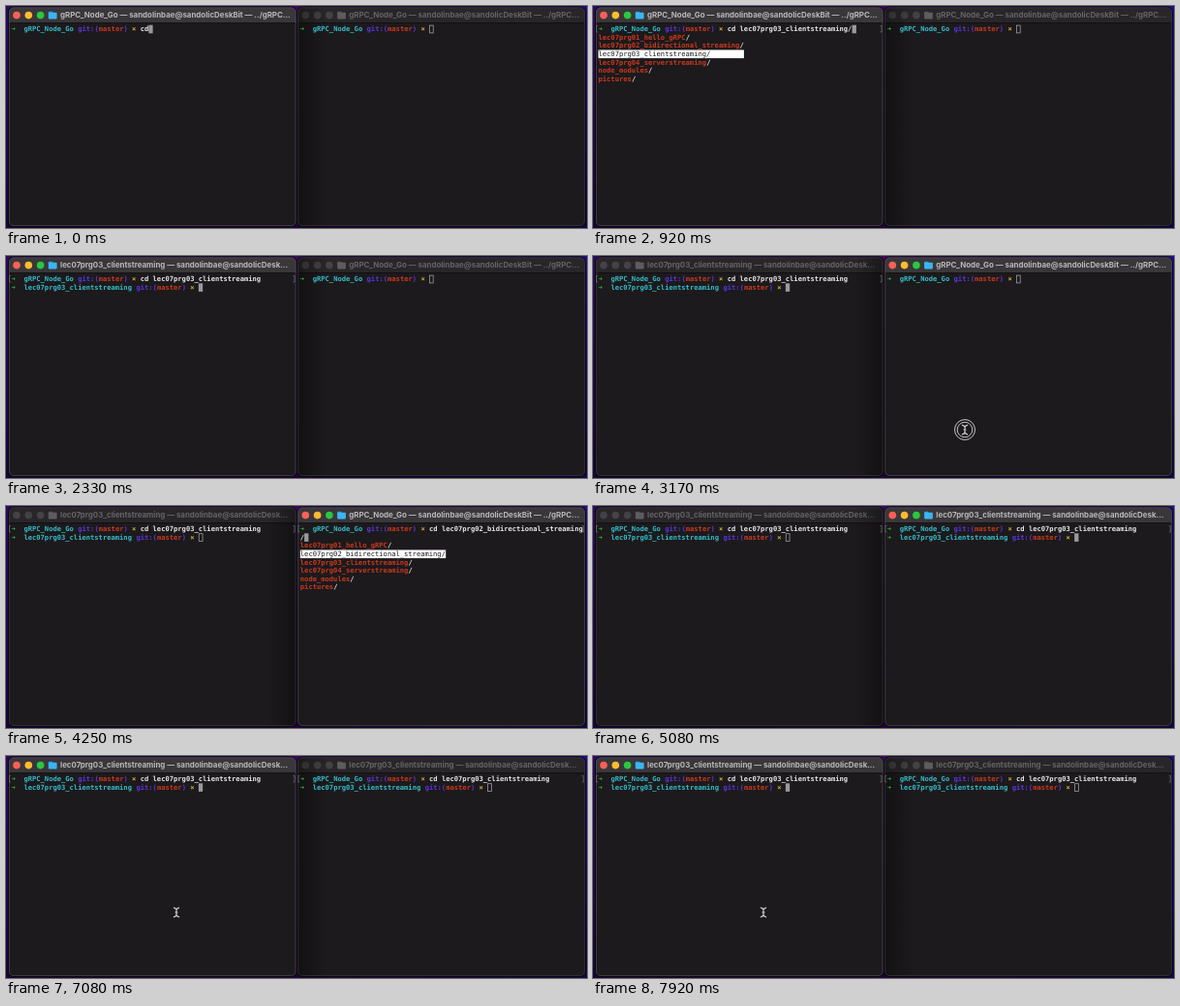
An HTML page with a canvas for the animation above (8 s loop, 600x230 px).

```html
<!DOCTYPE html>
<html lang="en">
<head>
<meta charset="utf-8">
<title>Two terminals</title>
<style>
  html, body { margin: 0; width: 100%; height: 100%; overflow: hidden; background: #1b0a48; }
  canvas { display: block; width: 600px; height: 230px; }
</style>
</head>
<body>
<canvas id="stage"></canvas>
<script>
const LOOP = 8000, COLS = 68, CELL = 4.297, ROW = 8.6, FIRST_ROW = 24;
const CURSOR_DELAY = 170;
const MONO = '7.14px "DejaVu Sans Mono", monospace';
const TITLE = '700 7.9px Inter, sans-serif';
const COLOR = {
  green: '#2fb43a', cyan: '#35bcca', blue: '#5a35dc', red: '#c8381f',
  yellow: '#c9b536', text: '#e6e4e6', cursor: '#9b999c'
};
const USER = 'sandolinbae', HOST = 'sandolicDeskBit';
const HOME = 'gRPC_Node_Go', TARGET = 'lec07prg03_clientstreaming';
const DIRS = ['lec07prg01_hello_gRPC', 'lec07prg02_bidirectional_streaming', TARGET,
  'lec07prg04_serverstreaming', 'node_modules', 'pictures'];

// Each step: start time, command text or picked menu index, phase.
const terminals = [
  { x: 0, steps: [
    [0, 'cd', 'type'], [160, 'cd ', 'type'], [240, -1, 'menu'], [410, 0, 'menu'],
    [580, 1, 'menu'], [740, 2, 'menu'], [1490, 'cd ' + TARGET, 'type'], [1660, '', 'done']] },
  { x: 298.3, steps: [
    [0, '', 'type'], [3410, 'c', 'type'], [3490, 'cd', 'type'], [3570, 'cd ', 'type'],
    [3740, -1, 'menu'], [3990, 0, 'menu'], [4160, 1, 'menu'], [4490, 2, 'menu'],
    [4910, 'cd ' + TARGET, 'type'], [5080, '', 'done']] }
];
const focusSteps = [[0, 0], [3080, 1], [5910, 0]];
// Pointer: time, x, y; it is hidden while typing.
const pointerPaths = [
  [[2580, 310, 150], [2990, 384, 180], [3410, 384, 180]],
  [[5410, 384, 180], [5830, 176, 162], [LOOP, 176, 162]]
];
const clicks = [[2990, 3260], [5830, 6080]];

const canvas = document.getElementById('stage');
const g = canvas.getContext('2d');
const ratio = window.devicePixelRatio || 1;
canvas.width = 600 * ratio;
canvas.height = 230 * ratio;
g.scale(ratio, ratio);
g.textBaseline = 'middle';

const stepAt = (steps, t) => steps.filter(s => s[0] <= t).pop();
const focusAt = t => stepAt(focusSteps, Math.max(0, t))[1];

function gradient(x0, y0, x1, y1, ...colors) {
  const fill = g.createLinearGradient(x0, y0, x1, y1);
  colors.forEach((c, i) => fill.addColorStop(i / (colors.length - 1), c));
  return fill;
}

function rect(x, y, w, h, color) {
  g.fillStyle = color;
  g.fillRect(x, y, w, h);
}

function roundRect(x, y, w, h, r) {
  g.beginPath();
  g.roundRect(x, y, w, h, r);
}

function circle(x, y, r) {
  g.beginPath();
  g.arc(x, y, r, 0, Math.PI * 2);
}

function line(points, color, width) {
  g.strokeStyle = color;
  g.lineWidth = width;
  g.beginPath();
  points.forEach(([x, y]) => g.lineTo(x, y));
  g.stroke();
}

const colX = col => 5.5 + col * CELL;
const rowY = row => FIRST_ROW + row * ROW;

function print(col, row, text, color, bold = true) {
  g.font = (bold ? 'bold ' : '') + MONO;
  g.fillStyle = color;
  g.fillText(text, colX(col), rowY(row) + 0.3);
  return col + text.length;
}

function prompt(row, dir) {
  print(0, row, '➜', COLOR.green);
  let col = print(3, row, dir, COLOR.cyan) + 1;
  col = print(col, row, 'git:(', COLOR.blue);
  col = print(col, row, 'master', COLOR.red);
  col = print(col, row, ')', COLOR.blue) + 1;
  return print(col, row, '×', COLOR.yellow) + 1;
}

function cursor(col, row, solid) {
  const x = colX(col), y = rowY(row) - 4.3;
  if (solid) return rect(x, y, 4.3, 8.6, COLOR.cursor);
  g.strokeStyle = COLOR.cursor;
  g.lineWidth = 0.8;
  g.strokeRect(x + 0.4, y + 0.4, 3.8, 7.8);
}

function marks() {
  const top = rowY(0) - 3.5, bottom = rowY(0) + 3;
  line([[5, top], [3.5, top], [3.5, bottom], [5, bottom]], '#777579', 0.7);
  line([[296.5, top], [298, top], [298, bottom], [296.5, bottom]], '#777579', 0.7);
}

function menu(row, picked) {
  DIRS.forEach((dir, i) => {
    const y = row + i;
    if (i === picked) {
      rect(colX(0), rowY(y) - 4.3, 35 * CELL, ROW, '#ffffff');
      print(0, y, dir + '/', '#1c1a1c', false);
    } else {
      print(print(0, y, dir, COLOR.red), y, '/', COLOR.text);
    }
  });
}

function titleBar(active, title) {
  rect(3, 1, 297, 16.5, active ? '#39373a' : '#282629');
  rect(3, 17.2, 297, 0.7, '#0c0a0d');
  ['#ff5f57', '#febc2e', '#28c840'].forEach((color, i) => {
    circle(11 + i * 12.3, 9.6, 3.8);
    g.fillStyle = active ? color : '#444246';
    g.fill();
  });
  g.fillStyle = active ? '#249ade' : '#545257';
  roundRect(43.8, 5.8, 4.5, 3, 0.8);
  g.fill();
  g.fillStyle = active ? '#3cb4f0' : '#5e5c61';
  roundRect(43.8, 6.8, 8.8, 6.6, 0.8);
  g.fill();
  g.font = TITLE;
  g.fillStyle = active ? '#b9b7ba' : '#656367';
  g.fillText(title, 56, 10);
}

function windowFrame(side, active, title) {
  g.save();
  roundRect(3, 1.5, 296.5, 226.5, 5);
  g.strokeStyle = '#08040f';
  g.lineWidth = 1.8;
  g.stroke();
  g.clip();
  rect(3, 1, 297, 228, '#1c1a1c');
  titleBar(active, title);
  if (!active) {
    // The focused neighbour casts a shadow across the shared edge.
    const edge = side ? 3 : 300, reach = side ? 30 : -30;
    rect(3, 1, 297, 228,
      gradient(edge, 0, edge + reach, 0, 'rgba(0,0,0,.35)', 'rgba(0,0,0,0)'));
  }
  g.restore();
  roundRect(3.4, 1.9, 295.7, 225.7, 4.6);
  g.strokeStyle = active ? '#525054' : '#3c3a3e';
  g.lineWidth = 0.7;
  g.stroke();
}

function terminal(side, t) {
  const { x, steps } = terminals[side];
  const [, value, phase] = stepAt(steps, t);
  const done = phase === 'done', listing = phase === 'menu';
  const solid = focusAt(t - CURSOR_DELAY) === side;
  const title = done
    ? `${TARGET} — ${USER}@${HOST.slice(0, 12)}...`
    : `${HOME} — ${USER}@${HOST} — ../gRPC...`;

  g.save();
  g.translate(x, 0);
  windowFrame(side, focusAt(t) === side, title);

  let command = value;
  if (listing) command = value < 0 ? 'cd ' : `cd ${DIRS[value]}/`;
  if (done) command = 'cd ' + TARGET;
  if (listing || done || command.length > 3) marks();

  const start = prompt(0, HOME), room = COLS - start;
  print(start, 0, command.slice(0, room), COLOR.text);
  const rest = command.slice(room), row = rest ? 1 : 0;
  if (rest) print(0, 1, rest, COLOR.text);
  if (listing) menu(row + 1, value);
  if (done) cursor(prompt(1, TARGET), 1, solid);
  else cursor(rest ? rest.length : start + command.length, row, solid);
  g.restore();
}

function pointerAt(t) {
  const path = pointerPaths.find(p => t >= p[0][0] && t < p[p.length - 1][0]);
  if (!path) return null;
  const i = path.findIndex(p => p[0] > t);
  const [t0, x0, y0] = path[i - 1], [t1, x1, y1] = path[i];
  const k = (t - t0) / (t1 - t0), ease = k * k * (3 - 2 * k);
  return [x0 + (x1 - x0) * ease, y0 + (y1 - y0) * ease];
}

function pointer(t) {
  const at = pointerAt(t);
  if (!at) return;
  const [x, y] = at;
  if (clicks.some(([from, to]) => t >= from && t < to)) {
    for (const r of [10.5, 7.8]) {
      circle(x, y, r);
      g.strokeStyle = '#c4c2c5';
      g.lineWidth = 1;
      g.stroke();
    }
  }
  for (const side of [-1, 1]) {
    line([[x - 3, y + side * 5], [x, y + side * 3.4], [x + 3, y + side * 5]], '#d8d6d9', 1.2);
  }
  line([[x, y - 4], [x, y + 4]], '#d8d6d9', 1.2);
  line([[x - 1.5, y], [x + 1.5, y]], '#d8d6d9', 0.8);
}

const desktop = gradient(0, 0, 600, 0, '#2a0a5c', '#3c0a5a', '#200c80');
const dusk = gradient(0, 0, 0, 230, 'rgba(4,2,24,0)', 'rgba(4,2,24,.55)');

function draw(t) {
  rect(0, 0, 600, 230, desktop);
  rect(0, 0, 600, 230, dusk);
  const front = focusAt(t);
  terminal(1 - front, t);
  terminal(front, t);
  pointer(t);
}

const began = performance.now();
function frame() {
  draw((performance.now() - began) % LOOP);
  requestAnimationFrame(frame);
}
frame();
</script>
</body>
</html>
```
